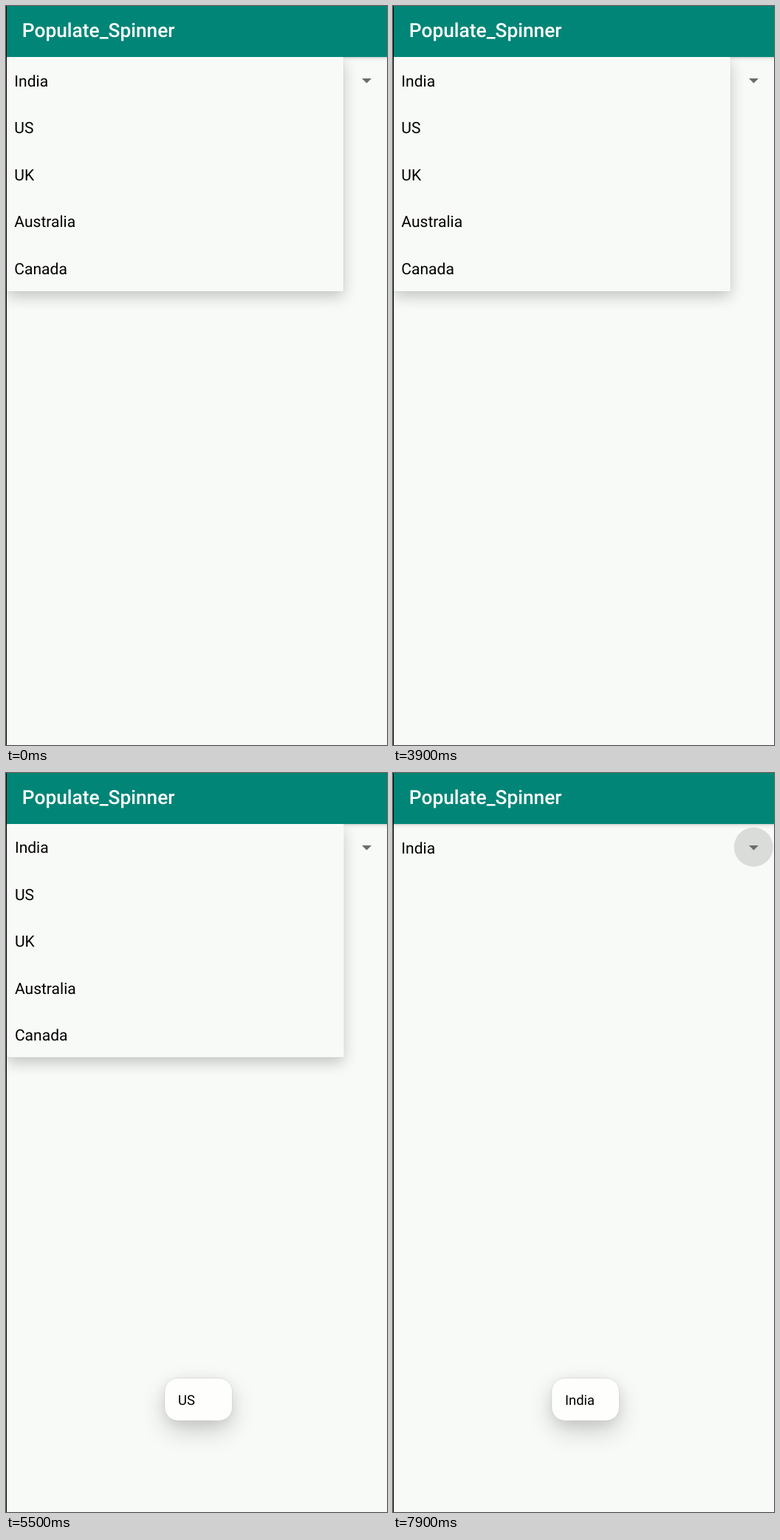
An HTML page for the animation above (8 s loop, 516 by 1000 pixels).

```html
<!DOCTYPE html>
<html lang="en">
<head>
<meta charset="utf-8">
<title>Spinner</title>
<style>
  html, body { margin: 0; width: 100%; height: 100%; overflow: hidden; background: #f8faf7; }
  svg { display: block; width: 100vw; height: 100vh; }
  text { font-family: Roboto, "Liberation Sans", sans-serif; font-size: 21.06px; text-rendering: geometricPrecision; }
</style>
</head>
<body>
<svg viewBox="0 0 516 1000">
  <defs>
    <linearGradient id="barShade" x1="0" y1="0" x2="0" y2="1">
      <stop offset="0" stop-color="#000" stop-opacity=".16"/>
      <stop offset=".4" stop-color="#000" stop-opacity=".05"/>
      <stop offset="1" stop-color="#000" stop-opacity="0"/>
    </linearGradient>
    <filter id="soft" x="-50%" y="-50%" width="200%" height="200%"><feGaussianBlur stdDeviation="10"/></filter>
    <filter id="wide" x="-150%" y="-150%" width="400%" height="400%"><feGaussianBlur stdDeviation="17"/></filter>
    <clipPath id="content"><rect x="1" y="69" width="515" height="931"/></clipPath>
    <clipPath id="row"><rect id="rowBox" x="1" width="456" height="63.4"/></clipPath>
    <clipPath id="list"><rect id="listBox" x="1" y="69" width="456"/></clipPath>
  </defs>

  <rect width="516" height="1000" fill="#f8faf7"/>
  <rect width="516" height="69" fill="#008577"/>
  <rect y="69" width="516" height="6" fill="url(#barShade)"/>
  <text x="21.8" y="42" fill="#fff" font-weight="500" style="font-size:26.3px">Populate_Spinner</text>

  <text id="selected" x="11.3" y="109"></text>
  <circle id="arrowRipple"/>
  <path d="M482 98H495L488.5 104.4Z" fill="#6b6c6b"/>

  <g id="popup" clip-path="url(#content)">
    <rect id="popupShadow" x="1" y="76" width="456" filter="url(#soft)" opacity=".21"/>
    <rect id="popupEdge" x=".5" y="69" width="457" rx="2" opacity=".07"/>
    <rect id="popupBody" x="1" y="69" width="456" rx="1.5" fill="#f8faf7"/>
    <g clip-path="url(#row)"><circle id="rowRipple" cx="229" opacity=".12"/></g>
    <g clip-path="url(#list)"><g id="items"></g></g>
  </g>

  <g id="toast">
    <rect x="215" y="833" width="91" height="57" rx="18" filter="url(#wide)" opacity=".17"/>
    <rect x="217" y="825" width="87" height="54" rx="18" filter="url(#soft)" opacity=".09"/>
    <rect x="214.9" y="819" width="91.6" height="57.4" rx="18" fill="#fefffd" stroke="#000" stroke-opacity=".09"/>
    <text id="toastText" x="233" y="854.5" style="font-size:18.42px"></text>
  </g>

  <rect width="1" height="1000"/>
</svg>
<script>
const LOOP = 8000, STEP = 100, ROW = 63.4, TOP = 69, LIST_HEIGHT = 317;
const countries = ['India', 'US', 'UK', 'Australia', 'Canada'];
const arrowTaps = [1870, 5170, 7670];
const picks = [{ at: 30, row: 0 }, { at: 3930, row: 1 }, { at: 6330, row: 0 }];
const POPUP_DELAY = 160, CLOSE_DELAY = 130, FADE = 160;

const $ = id => document.getElementById(id);
const progress = (t, start, length) => Math.min(1, Math.max(0, (t - start) / length));
const easeOut = (p, power) => 1 - (1 - p) ** power;
const set = (id, attrs) => {
  for (const name in attrs) $(id).setAttribute(name, attrs[name]);
};
const latest = (list, t) => list.filter(time => time <= t).pop();

$('items').innerHTML = countries
  .map((name, i) => `<text x="11.3" y="${109 + i * ROW}">${name}</text>`).join('');

function drawArrowRipple(t) {
  const tap = latest(arrowTaps, t);
  const p = progress(t, tap ?? t, 200);
  const held = tap === arrowTaps[2];
  const fade = held ? 1 : 1 - progress(t, tap + POPUP_DELAY, 150);
  set('arrowRipple', {
    cx: 488.3 - 8.2 * (1 - p), cy: 100.3 + 2 * (1 - p), r: 26.5 - 8.2 * (1 - p),
    opacity: tap === undefined ? 0 : 0.12 * Math.min(1, p * 1.6) * fade
  });
}

function drawPopup(t) {
  const tap = latest(arrowTaps, t);
  const opened = tap === undefined ? -1000 : tap + POPUP_DELAY;
  const pick = picks.find(({ at }) => at > opened);
  const p = progress(t, opened, 190);
  const fadeOut = pick ? 1 - progress(t, pick.at + CLOSE_DELAY, FADE) : 0;
  const rest = (1 - p) ** 2.4;
  const shift = 28 * (1 - p) ** 1.7;
  const height = LIST_HEIGHT - 255 * rest;

  set('popup', {
    opacity: Math.min(1, p * 2) * fadeOut,
    display: t < opened || !fadeOut ? 'none' : 'inline'
  });
  set('popupShadow', { height });
  set('popupEdge', { height: height + 0.6 });
  for (const id of ['popupBody', 'listBox']) set(id, { x: 1 + shift, height });
  set('items', { transform: `translate(${shift} ${-128 * rest})` });

  const row = pick ? pick.row : 0;
  const grow = pick ? easeOut(progress(t, pick.at, 225), 3.6) : 0;
  set('rowBox', { y: TOP + row * ROW });
  set('rowRipple', { cy: TOP + (row + 0.5) * ROW, r: 231 * grow });
}

function drawToast(t) {
  const second = t >= 6660;
  const enter = progress(t, second ? 6660 : 4120, 237);
  const leave = second ? 0 : progress(t, 6520, 140);
  const rest = (1 - enter) ** 2 + leave * leave;
  $('toastText').textContent = second ? 'India' : 'US';
  set('toast', {
    opacity: Math.min(1, enter * 3) * (1 - leave),
    transform: `translate(260.5 ${847.5 + 10 * rest}) scale(${1 - 0.1 * rest}) translate(-260.5 -847.5)`
  });
}

function draw(t) {
  const changed = picks.map(({ at }) => at + CLOSE_DELAY);
  $('selected').textContent = t >= changed[1] && t < changed[2] ? 'US' : 'India';
  drawArrowRipple(t);
  drawPopup(t);
  drawToast(t);
}

const start = performance.now();
function tick() {
  const t = (performance.now() - start) % LOOP;
  draw(Math.floor(t / STEP) * STEP);
  requestAnimationFrame(tick);
}
draw(0);
requestAnimationFrame(tick);
</script>
</body>
</html>
```
